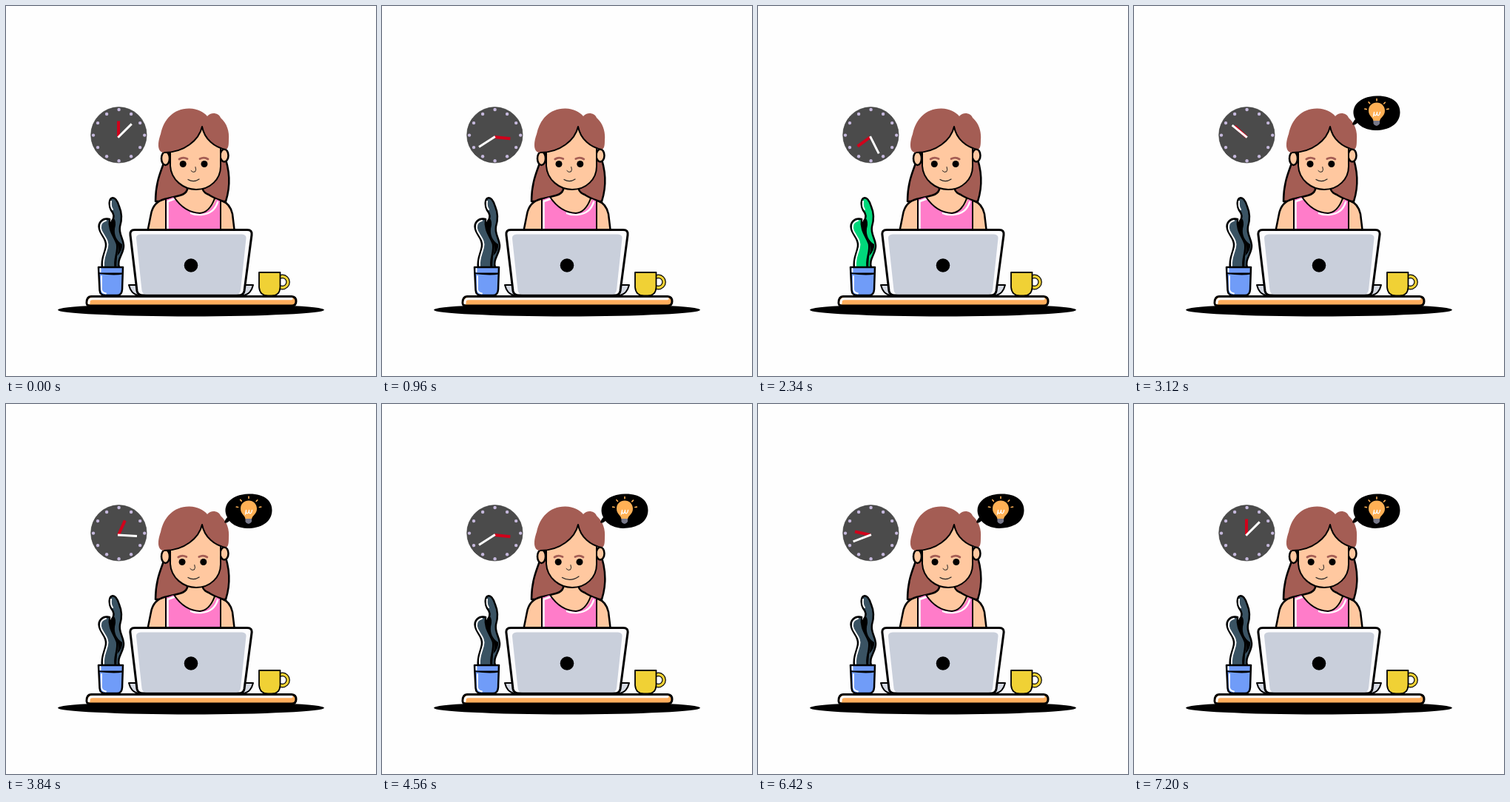
Animation of 500x500 px, one loop 7230 ms. Source, as an HTML page:

```html
<!DOCTYPE html>
<html lang="en">
<head>
<meta charset="utf-8">
<title>Working at a desk</title>
<style>
  html, body { margin: 0; width: 100%; height: 100%; overflow: hidden; background: #fefefe; }
  svg { display: block; width: 100vw; height: 100vh; }
  .ink { stroke: #000; stroke-width: 2.5; stroke-linejoin: round; stroke-linecap: round; }
  .thin { stroke-width: 2; }
  .bold { stroke-width: 3; }
  .line { fill: none; stroke-linecap: round; stroke-linejoin: round; }
  .hair { fill: #a45d54; }
  .skin { fill: #ffc8a0; }
  .white { stroke: #fff; stroke-width: 2.5; }
</style>
</head>
<body>
<svg viewBox="0 0 500 500">
  <!-- clock -->
  <circle cx="152.4" cy="174.3" r="37.7" fill="#4b4b4b" stroke="#333" stroke-width=".6"/>
  <g id="dots" fill="#c5b8dc"></g>
  <path id="hour" d="M152 177V155.5" stroke="#d0021b" stroke-width="4"/>
  <path id="minute" d="M152 178V152" stroke="#fff" stroke-width="3"/>

  <!-- back hair -->
  <path class="hair ink" d="M217 199C213 218 202 232 202 264H297C304 242 303 222 294 199Z"/>

  <!-- body -->
  <path class="skin ink" d="M245 236V248Q243 254 235 256Q224 259 214 261Q199 265 196 281L191 306H309L306 281Q303 267 291 263Q280 259 274 255Q267 252 266 248V236Z"/>
  <path d="M216 262L227 258Q241 279 262 280Q277 279 284 261L290 264V306H216Z" fill="#ff7cc9"/>
  <path class="line white" d="M218.500 304V264L227 261M250 280Q256 282.500 264 282Q281 281 286 265"/>
  <path class="line ink thin" d="M216 262V304M290 264V304M227 258Q241 279 262 280Q275 279 282 260"/>

  <!-- head -->
  <ellipse class="skin ink" cx="215.500" cy="206" rx="5.500" ry="9"/>
  <ellipse class="skin ink" cx="295" cy="202" rx="5.500" ry="8.500"/>
  <path class="skin ink thin" d="M222 190V216C223 235 240 248 257 248C276 248 290 234 290 217V184L264 160Z"/>
  <path class="hair" d="M212 198C204 196 205 184 209 173C213 153 227 138 248 138.500C259 139 267 143 272 149C277 143 287 144 290 151C299 159 302 170 301 181C301 190 300 193 297 194C282 190 268 179 265 163C262 180 240 199 212 198Z"/>
  <path class="line ink thin" d="M214 198C241 198 261 181 265 163C268 180 282 191 297 194"/>

  <!-- face -->
  <g id="face">
    <path class="line" stroke="#a45d54" stroke-width="2.800" d="M234 207Q239 203.500 245 206.500M262 206.500Q268 203.500 273 207"/>
    <circle cx="239.200" cy="213.500" r="4.500"/>
    <circle cx="268" cy="213.500" r="4.500"/>
    <path class="line" stroke="#222" d="M256 217.500Q257.500 222 255.500 224Q252 225.500 250 222.500"/>
  </g>
  <path id="mouth" class="line" stroke="#222" stroke-width="1.200"/>

  <!-- desk -->
  <ellipse cx="250" cy="410.700" rx="180" ry="8.700"/>
  <path class="ink bold" fill="#ffad5c" d="M115 392.500H386Q392 393 392 399Q392 405 386 405H113Q109 405 109 401Q109 393 115 392.500Z"/>
  <path class="line white" style="stroke-width:3.200" d="M112 401.500Q111.500 395.600 117 395.600H386"/>

  <!-- laptop -->
  <path class="ink thin" fill="#d5d9e2" d="M166 377H180V391H178Q169 389 166 377ZM334 377H318V391H322Q331 389 334 377Z"/>
  <path class="ink bold" fill="#fcfcfe" d="M174 302.500H326Q333 302.500 332 309.500L322 385Q321 391 315 391H185Q178 391 177 385L168 309.500Q167 302.500 174 302.500Z"/>
  <path fill="#c9cfdb" d="M182 308.500H319Q325 309 324.500 314L317 384Q316 389.500 311 389.500H190Q184 389.500 183.500 384L176 314Q175.500 309 182 308.500Z"/>
  <circle cx="250" cy="350.500" r="9.300"/>

  <!-- plant -->
  <g id="plant" class="ink">
    <path d="M142 260C139 263 139 271 142 276C146 281 147 285 143 291C138 300 142 310 147 317C151 325 148 340 148 354H153C149 342 160 334 159 323C158 313 152 308 154 298C157 288 156 278 153 271C151 264 147 257 142 260Z"/>
    <path d="M140 288C130 286 124 293 126 301C128 310 136 314 135 324C134 334 128 341 130 354H148C145 342 152 333 150 322C147 312 138 304 140 288Z"/>
  </g>
  <path class="line white" style="stroke-width:2" d="M142 264Q141 271 144 275M135 290C127 292 127 299 129 304C133 312 139 317 137 326C135 335 131 341 132 351"/>
  <path d="M145 286C137 296 140 304 146 312C152 320 153 329 150 338Q158 330 157 322C149 317 146 309 147 301Q150 291 145 286Z"/>

  <!-- pot -->
  <path class="ink" fill="#709cf8" d="M125 353H158L157 383Q156.500 391 150 391H134Q127 391 126.500 384Z"/>
  <path class="line white" style="stroke-width:1.800" d="M127.500 355V359M129 365V383Q130 388 135 388.500"/>
  <path d="M125 360.500H158V362.500Q146 364.500 125 362Z"/>

  <!-- mug -->
  <circle class="line" cx="373.500" cy="373" r="7.600" stroke="#000" stroke-width="5.600"/>
  <circle class="line" cx="373.500" cy="373" r="7.600" stroke="#f0d135" stroke-width="3.200"/>
  <path class="ink" fill="#f0d135" style="stroke-width:1.800" d="M342 360H370.500V380Q370 391.500 359 391.500H354Q343 391.500 342 380Z"/>

  <!-- idea -->
  <g id="idea">
    <path d="M295 160Q296 156 299 153C291 138 303 122 328 121.500C349 121 360 131 359.500 144C359 160 344 168 326 168C315 167.500 307 164 302 158Q298 162 295 160Z"/>
    <path id="rays" class="line" stroke="#ffb055" stroke-width="1.600"/>
    <path fill="#ffb055" d="M323.500 155.500C323 150 317 149 317 141.500C317 134.500 322 130.500 328 130.500C334 130.500 339 135 339 141.500C339 149 333 150 332 155.500Z"/>
    <path class="line" stroke="#fff" stroke-width="1.300" d="M323.500 149L324.500 143.500V147Q327.500 149.500 328.500 143.500V147Q331.500 149.500 332.500 143.500"/>
    <path fill="#77798a" d="M323.500 155H332V159Q330 162 327.800 162Q325 162 323.500 159Z"/>
  </g>
</svg>
<script>
const $ = id => document.getElementById(id);
const LOOP = 7230, TURN = 3600;
const clamp = x => Math.max(0, Math.min(1, x));
const ease = (t, a, b) => { const x = clamp((t - a) / (b - a)); return x * x * (3 - 2 * x); };
const overshoot = x => 1 + 2.2 * (x - 1) ** 3 + 1.2 * (x - 1) ** 2;
const polar = (cx, cy, r, deg) => {
  const a = deg * Math.PI / 180;
  return `${cx + r * Math.cos(a)} ${cy + r * Math.sin(a)}`;
};

// the quarter-hour dots sit slightly further out
for (let i = 0; i < 12; i++) {
  const [x, y] = polar(152.6, 174.6, i % 3 ? 33 : 34.6, i * 30).split(' ');
  $('dots').innerHTML += `<circle cx="${x}" cy="${y}" r="2.2"/>`;
}

function draw(t) {
  const turn = t / TURN * 360;
  $('hour').setAttribute('transform', `rotate(${turn} 152 177)`);
  $('minute').setAttribute('transform', `rotate(${45 + 2 * turn} 152 177)`);

  $('plant').setAttribute('fill', t >= 2190 && t < 2550 ? '#00d87b' : '#3a5363');

  const look = -0.6 * (1 - Math.cos(2 * Math.PI * t / 7200));
  $('face').setAttribute('transform', `translate(${look} 0)`);
  const smile = ease(t, 3800, 4450) - ease(t, 5700, 6300);
  $('mouth').setAttribute('d',
    `M${246 - 2.5 * smile} 234.5Q${253.5 + smile} ${239 + 2 * smile} ${261 + 5 * smile} ${234 - smile}`);

  const pop = overshoot(clamp((t - 2600) / 450));
  $('idea').style.display = t < 2600 ? 'none' : '';
  $('idea').setAttribute('transform', `translate(296 160) scale(${Math.max(0, pop)}) translate(-296 -160)`);
  const reach = 16.2 + 0.8 * Math.sin(2 * Math.PI * t / 900);
  $('rays').setAttribute('d', [-170, -132, -90, -46, -10].map(a =>
    `M${polar(328, 142, reach - 2.4, a)}L${polar(328, 142, reach, a)}`).join(''));
}

const start = performance.now();
function tick() {
  draw((performance.now() - start) % LOOP);
  requestAnimationFrame(tick);
}
tick();
</script>
</body>
</html>
```
